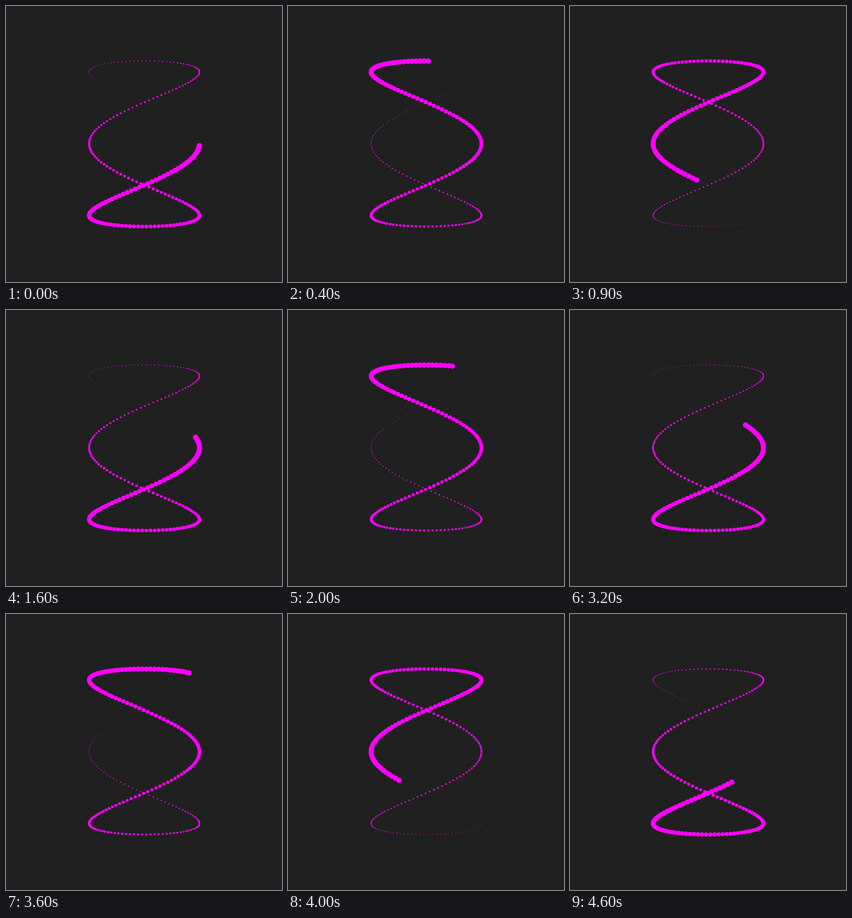
Write an HTML page with a canvas that moves like this. It is 512 px wide and 512 px high and loops after 4.7 s.

```html
<!DOCTYPE html>
<html lang="en">
<head>
<meta charset="utf-8">
<title>Lissajous trail</title>
<style>
  html, body { margin: 0; width: 100%; height: 100%; overflow: hidden; background: #202020; }
  canvas { display: block; width: 512px; height: 512px; }
</style>
</head>
<body>
<canvas id="stage" width="512" height="512"></canvas>
<script>
const ctx = document.getElementById('stage').getContext('2d');
const LOOP = 4700, TICK = 100;
const DOTS = 250, DOTS_PER_TICK = 16;
const MAX_RADIUS = 5, TAPER = 1.17;

// The curve closes after DOTS equally spaced steps of the parameter.
function point(i) {
  const u = i / DOTS * 2 * Math.PI;
  return [256.5 + 102.4 * Math.cos(3 * u), 255.5 + 153.6 * Math.sin(u)];
}

function draw(tick) {
  ctx.fillStyle = '#202020';
  ctx.fillRect(0, 0, 512, 512);
  ctx.fillStyle = '#ff00ff';
  const head = 1 - tick * DOTS_PER_TICK;
  for (let age = DOTS - 1; age >= 0; age--) {
    const [x, y] = point(head + age);
    const radius = MAX_RADIUS * Math.pow(1 - age / DOTS, TAPER);
    ctx.beginPath();
    ctx.arc(x, y, radius, 0, 2 * Math.PI);
    ctx.fill();
  }
}

const start = performance.now();
function loop() {
  draw(Math.floor((performance.now() - start) % LOOP / TICK));
  requestAnimationFrame(loop);
}
loop();
</script>
</body>
</html>
```
